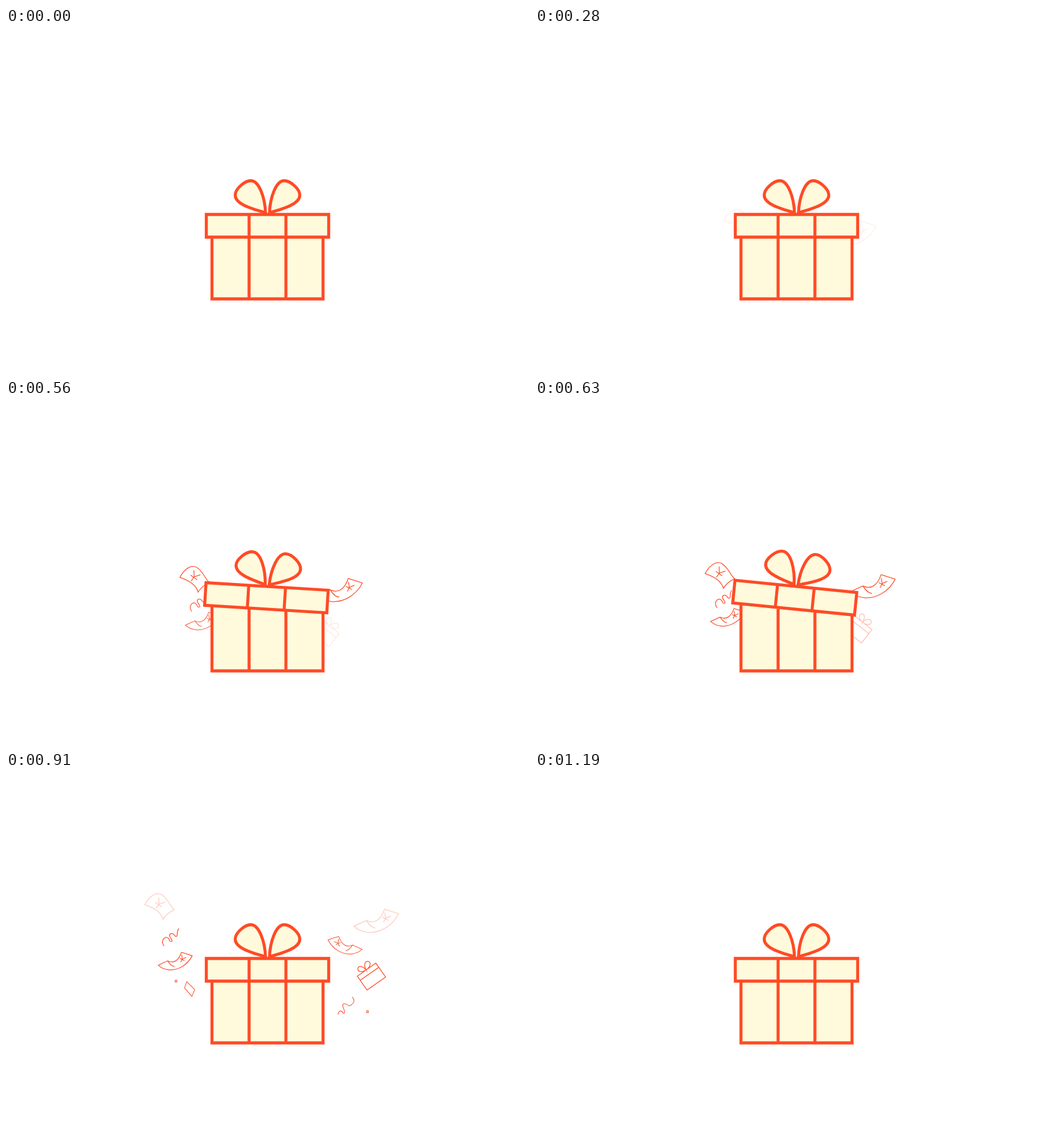
Write an HTML page with a canvas that moves like this. It is 923 px wide and 607 px high and loops after 1260 ms.

```html
<!DOCTYPE html>
<html lang="en">
<head>
<meta charset="utf-8">
<title>Gift box</title>
<style>
  html, body { margin: 0; height: 100%; overflow: hidden; background: #fff; }
  canvas { display: block; }
</style>
</head>
<body>
<canvas id="stage" width="923" height="607"></canvas>
<script>
const ctx = document.getElementById('stage').getContext('2d');
const RED = '#ff4b26', CREAM = '#fffadc';
const LOOP = 1260, STEP = 70, BURST = 770;
const MID = 461.5, PIVOT = 318;

const clamp = v => Math.max(0, Math.min(1, v));
const radians = deg => deg * Math.PI / 180;
const shape = d => new Path2D(d);

function joined(d, extra, matrix) {
  const path = shape(d);
  path.addPath(shape(extra), matrix);
  return path;
}

const yen = 'M-6 -8L0 0L6 -8M0 0V8M-6 1H6';
const sheet = joined(
  'M-25 -2C-18 -16 -6 -25 4 -20C16 -13 18 -1 27 7C20 10 12 16 7 24C4 11 -10 3 -25 -2Z',
  yen, new DOMMatrix().translate(0, -3).rotate(35).scale(1.15));
const note = joined(
  'M14 -21L39 -13C28 9 6 21 -14 20C-26 19 -34 15 -40 9L-18 -1C-14 5 -9 12 -2 12' +
  'M14 -21C8 -2 -4 6 -18 -1',
  yen, new DOMMatrix().translate(16, -5).rotate(28));
const gift = shape('M-20 -15H20V15H-20ZM-20 -6H20' +
  'M-1 -15C-8 -15 -15 -19 -12 -25C-7 -30 -2 -24 -1 -15C0 -24 6 -30 11 -25C14 -19 7 -15 -1 -15');
const curlLeft = shape('M-11 16C-18 7 -10 -3 -4 2C0 6 -2 9 2 8C7 7 -7 -3 1 -6' +
  'C7 -8 7 1 11 -1C14 -3 10 -9 15 -15');
const curlRight = shape('M-14 16C-12 6 -7 10 -4 14C2 12 -10 0 -4 -3' +
  'C4 -4 4 4 9 -1C15 -5 16 -9 11 -15');
const diamond = shape('M-5 -13L9 1L4 13L-9 -2Z');
const dot = shape('M-1.5 -1.5H1.5V1.5H-1.5Z');

// reach: sideways distance covered on the way to (x, y); born and gone bound the fade
const pieces = [
  { path: sheet, x: 270, y: 236, reach: 42, born: 250, gone: 970 },
  { path: note, x: 654, y: 263, reach: 44, born: 250, gone: 970 },
  { path: note, x: 299, y: 334, reach: 28, born: 320, scale: .76 },
  { path: note, x: 598, y: 306, reach: 57, born: 660, scale: .76, flip: true },
  { path: gift, x: 645, y: 361, reach: 62, born: 520, swing: true },
  { path: curlLeft, x: 290, y: 291, reach: 29, born: 280 },
  { path: curlRight, x: 600, y: 412, reach: 43, born: 660 },
  { path: diamond, x: 324, y: 383, reach: 28, born: 660 },
  { path: dot, x: 300, y: 369, reach: 29, born: 660 },
  { path: dot, x: 638, y: 423, reach: 43, born: 660 }
];

const body = shape('M363.5 345V478H559.5V345');
const bodyStripes = shape('M429 369V480M494 369V480');
const lid = shape('M353.5 329H569.5V369H353.5Z');
const lidStripes = shape('M429 329V369M494 329V369');
const loop = 'M458 326C457 300 447 269.5 432 269.5C421 269.5 404.5 284 404.5 295' +
  'C404.5 310 430 318 458 326Z';
const bow = joined(loop, loop, new DOMMatrix([-1, 0, 0, 1, 2 * MID, 0]));

// A slow drift out of the box, then a burst that eases out
function drawPiece({ path, x, y, reach, born, gone = 1190, scale = 1, flip, swing }, t) {
  const alpha = clamp((t - born) / 300) * clamp((gone - t) / 200);
  if (!alpha) return;
  const drift = Math.max(0, BURST - t) / 10.5;
  const burst = 1 - 1.7 * Math.sin(clamp((t - BURST) / 350) * Math.PI / 2);
  const climb = 16 + .23 * (423 - y);
  ctx.save();
  ctx.globalAlpha = alpha;
  ctx.translate(x + Math.sign(MID - x) * (reach * burst + drift), y + climb * burst + drift);
  if (swing) ctx.rotate(radians(73 * clamp(burst) - 35));
  ctx.scale(flip ? -scale : scale, scale);
  ctx.lineWidth = 1.3 / scale;
  ctx.stroke(path);
  ctx.restore();
}

function solid(path) {
  ctx.fill(path);
  ctx.stroke(path);
}

function drawBox(t) {
  const shake = clamp((t - 525) / 350);
  ctx.lineWidth = 5.3;
  solid(body);
  ctx.stroke(bodyStripes);
  ctx.save();
  ctx.translate(MID, PIVOT);
  ctx.rotate(radians(6 * Math.sin(shake * 2 * Math.PI)));
  ctx.translate(-MID, -PIVOT);
  ctx.lineJoin = 'round';
  solid(bow);
  ctx.lineJoin = 'miter';
  solid(lid);
  ctx.stroke(lidStripes);
  ctx.restore();
}

function frame(now) {
  const t = Math.floor((now % LOOP) / STEP) * STEP;
  ctx.clearRect(0, 0, 923, 607);
  ctx.strokeStyle = RED;
  ctx.fillStyle = CREAM;
  pieces.forEach(p => drawPiece(p, t));
  drawBox(t);
  requestAnimationFrame(frame);
}
requestAnimationFrame(frame);
</script>
</body>
</html>
```
